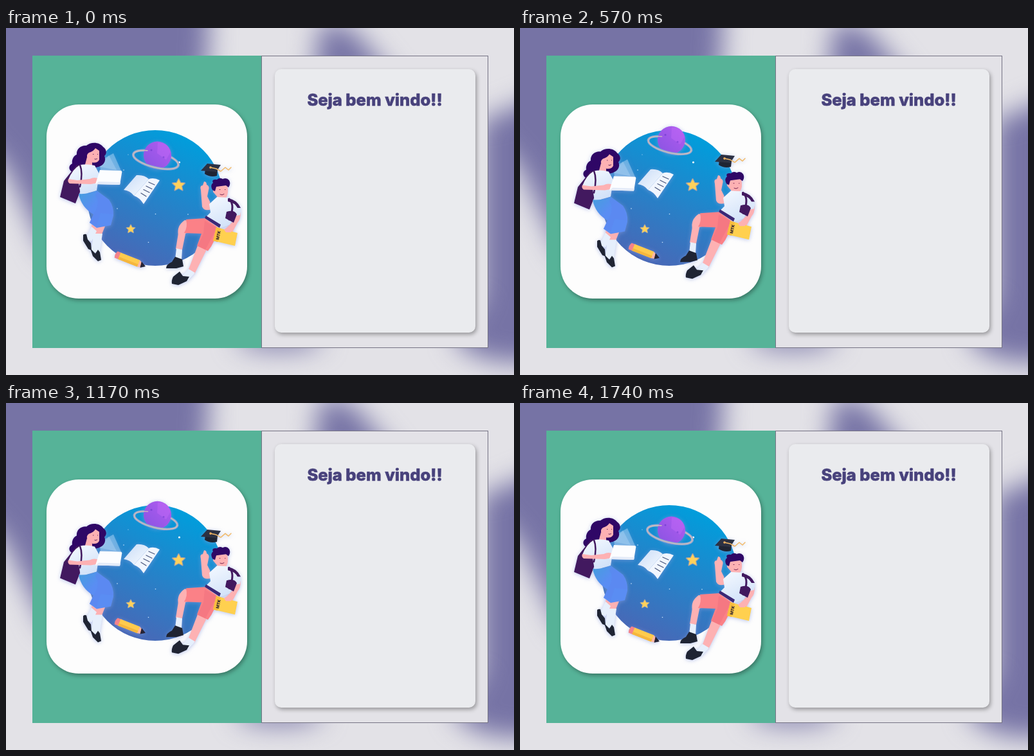
Animation of 790 by 540 pixels, one loop 1770 ms. Source, as an HTML page:

```html
<!DOCTYPE html>
<html lang="pt">
<head>
<meta charset="utf-8">
<title>Seja bem vindo</title>
<style>
html, body { margin: 0; width: 100%; height: 100%; overflow: hidden; background: #e3e2e7 }
svg { display: block; width: 790px; height: 540px }
.blur { filter: blur(20px); fill: #7673a5 }
.card { filter: drop-shadow(2px 3px 3px #0005) }
.glow { filter: drop-shadow(0 1px 3px #8c9fe099) }
.skin { fill: #fdb1b3 }
.hair { fill: #2f0766 }
.bag { fill: #42195f }
.shoe { fill: #1f2433 }
.sock { fill: #e6effc }
.line { fill: none; stroke-linecap: round; stroke-linejoin: round }
.title { font: 800 25.5px Inter, "Open Sans", sans-serif; fill: #48427c; stroke: #48427c; stroke-width: .6; stroke-linejoin: round }
</style>
</head>
<body>
<svg viewBox="0 0 790 540">
<defs>
  <linearGradient id="sky" x1=".75" y1=".05" x2=".3" y2="1"><stop stop-color="#009edc"/><stop offset="1" stop-color="#4b66b5"/></linearGradient>
  <linearGradient id="shirt" x1=".2" y1="0" x2=".7" y2="1"><stop stop-color="#f3f8ff"/><stop offset="1" stop-color="#cfe0f8"/></linearGradient>
  <linearGradient id="jeans" x1="0" y1="0" x2=".7" y2=".7"><stop stop-color="#449fdc"/><stop offset=".6" stop-color="#5a8df3"/></linearGradient>
  <linearGradient id="page" x1="0" y1="0" x2="1" y2="1"><stop stop-color="#c9dcf7"/><stop offset="1" stop-color="#f8fbff"/></linearGradient>
  <linearGradient id="violet" x1="1" y1="0" x2="0" y2="1"><stop stop-color="#b45cf0"/><stop offset="1" stop-color="#8854e2"/></linearGradient>
  <path id="star" d="M0-9L3-3 9.500-2.500 4.600 2 6 8.500 0 5.200-6 8.500-4.600 2-9.500-2.500-3-3Z" fill="#ffd15b" stroke="#8f9bb0" stroke-width="2.500" stroke-linejoin="round" paint-order="stroke"/>
</defs>

<rect width="790" height="540" fill="#e3e2e7"/>
<g class="blur">
  <path d="M-80-80H318L313 60 200 400 62 350 0 218-80 130Z"/>
  <path d="M484 0Q510-18 545 8L612 90H474Q488 40 484 0Z"/>
  <path d="M860 95L738 145V420L694 480Q725 522 800 520H860Z"/>
  <ellipse cx="425" cy="484" rx="68" ry="16"/>
</g>

<rect x="41" y="43" width="356" height="455" fill="#56b398"/>
<rect x="397.5" y="43.500" width="352" height="454" fill="#e3e2e7" stroke="#757384"/>
<rect class="card" x="418" y="64" width="312" height="410" rx="10" fill="#eaebee"/>
<rect class="card" x="63" y="119" width="312" height="302" rx="50" fill="#fdfdfd"/>
<text class="title" x="573.5" y="120.500" text-anchor="middle">Seja bem vindo!!</text>

<circle cx="232" cy="264.5" r="105.5" fill="url(#sky)"/>
<g fill="#cfe6ff">
  <circle cx="269.5" cy="209" r="1.6" fill="#fff"/>
  <circle cx="232.500" cy="289.500" r=".8"/><circle cx="173" cy="281" r=".8"/><circle cx="221.500" cy="333.500" r=".8"/>
  <circle cx="183" cy="221" r=".8"/><circle cx="283" cy="290" r=".8"/><circle cx="190" cy="197" r=".6"/>
</g>

<g class="glow" data-y="-12">
  <path d="M203 229Q215 228 222 235L199 261Q193 253 183 252Z" fill="url(#page)"/>
  <path d="M222 235Q230 232 239 237L214 274Q208 264 199 261Z" fill="#f1f6ff"/>
  <path class="line" d="M222 240l9 4M218 246l9 4.500M214 251.500l9 4.500M210 257l8 5" stroke="#4b577d" stroke-width="1.300"/>
</g>
<use href="#star" x="268.500" y="244"/>
<use href="#star" transform="translate(194 312.500)scale(.7)"/>

<path class="line" data-ring d="M-36 0A36 12 0 0 1 36 0" stroke="#8ba5d3" stroke-width="4"/>
<g class="glow" data-y="-31.500">
  <circle cx="235.500" cy="198" r="21.500" fill="url(#violet)"/>
  <path d="M236 178Q252 178 256 193L249 205 235 195Z" fill="#bd68f5" opacity=".5"/>
  <circle cx="226" cy="190" r="1.500" fill="#7d45d6"/><circle cx="245" cy="201" r="1.500" fill="#8b4bdd"/>
</g>
<g class="line" data-ring>
  <path d="M36 0A36 12 0 0 1-36 0" stroke="#8ba5d3" stroke-width="4"/>
  <path d="M-16-10.700A36 12 0 0 0-36 0A36 12 0 0 0 36 0Q35-6 23-9.200" stroke="#d5c2b8" stroke-width="1.300"/>
</g>

<g class="glow" data-y="-17.500">
  <g transform="translate(170 351.500)rotate(21.500)">
    <path d="M2-5H9V6H1Q-1 0 2-5Z" fill="#f4838b"/>
    <path d="M7-5H39L46 0 39 6H7Z" fill="#ffcb4d"/>
    <path d="M7 2H39V6H7Z" fill="#f5b63d"/>
    <path d="M39-5L46-1 44 5 39 6Z" fill="#fdb7a7"/>
    <path d="M43-3L50 1 44 5Z" fill="#252336" stroke="#252336" stroke-linejoin="round"/>
  </g>
</g>

<g class="glow" data-y="12.500">
  <path d="M145 207L167 195 179 222 147 221Z" fill="#cbe8ff" opacity=".4"/>
  <path d="M146 216L160 198 172 221Z" fill="#d9efff" opacity=".25"/>
  <path class="hair" d="M106 225C97 223 96 214 103 211 102 205 105 199 110 197 109 188 117 182 125 183 132 177 145 177 151 185 157 189 157 196 153 199 156 206 153 213 144 216 138 214L129 211C121 212 118 226 106 225Z"/>
  <path class="bag" d="M110 213L119 214 117 250 108 273 84 263 90 238Z"/>
  <path class="skin" d="M126 201L134 209 134 217 122 216Z"/>
  <path class="skin" d="M129 194Q136 192 139 187L145 191 145 205Q142 211 133 209L127 204Q124 197 129 194Z"/>
  <path class="line" d="M135.500 196.500h.5M142.500 196.500h.2M138 204q2 1 3.500-.5" stroke="#5a245e"/>
  <path d="M115 213Q126 211 138 214L145 227 141 253 116 260 113 241 97 236Q103 220 115 213Z" fill="url(#shirt)"/>
  <path class="line" d="M115 213Q120 225 115 247" stroke="#42195f" stroke-width="2.500"/>
  <path class="skin" d="M97 235L111 237 130 235Q138 231 145 235L143 241 132 243 99 242Q95 239 97 235Z"/>
  <path d="M146 221L179 222Q181 223 180 226L177 244 139 243Z" fill="#fcfdff"/>
  <path d="M140 243L177 244 178 240 144 239Z" fill="#e4ebf8"/>
  <path class="skin" d="M134 304L155 306 147 326 130 323Z"/>
  <path class="sock" d="M133 309L141 316 133 332 124 328ZM136 320L150 320 146 347 137 350 133 344Z"/>
  <path d="M113 258Q128 259 141 253L160 267Q168 278 167 292L163 307 141 311 130 303 136 290Q117 279 113 258Z" fill="url(#jeans)"/>
  <path d="M139 261Q148 272 136 290L130 303 141 307 147 288 167 290 161 268 141 254Z" fill="#5d85ef" opacity=".5"/>
  <path class="shoe" d="M120 322Q122 320 125 321L127 329 132 335 133 346 128 344 120 331ZM131 343L139 351 143 345 146 349 148 361 143 363 135 355Z"/>
</g>

<g class="glow" data-y="-18.500">
  <path class="shoe" d="M310 219L329 221 328 230Q318 233 309 227Z"/>
  <path d="M303 222L313 211 334 213 327 224Z" fill="#2c3143"/>
  <path class="line" d="M318 217L327 219 334 223 341 217 346 221 350 217" stroke="#f2b967" stroke-width="1.500"/>
  <circle cx="318" cy="217" r="1.800" fill="#f6b05f"/>
</g>

<g class="glow" data-y="-13">
  <path class="skin" d="M303 252Q301 245 306 245L308 239Q312 239 312 244 317 246 315 252L313 262 317 270 320 282Q308 286 305 278Z"/>
  <path class="skin" d="M324 246L344 245Q347 258 342 264L339 268 329 266 328 262 322 255Z"/>
  <path class="hair" d="M321 252Q317 244 322 241 319 235 328 236 332 232 337 235 343 232 347 237 350 243 346 248L342 245 327 247 325 254Z"/>
  <path class="line" d="M332 251.500h1M340.500 251.500h.5M333 259q3 2 6-.5" stroke="#7b2854"/>
  <path class="skin" d="M354 284L365 287Q365 298 360 303L352 318 341 319 339 315 352 302Z"/>
  <path class="skin" d="M270 307L281 311 274 345 264 344ZM299 336L312 345 293 383 283 378Z"/>
  <path class="sock" d="M265 343L274 345 273 361 263 360ZM284 375L294 381 283 393 273 388Z"/>
  <path class="shoe" d="M249 374Q249 368 258 364L263 356 274 360 276 371 265 374ZM258 398Q257 393 260 387L270 379 275 386 285 387 281 394 268 400Z"/>
  <path class="skin" d="M278 299L296 303 282 319 268 322Q265 308 278 299Z"/>
  <path d="M280 298L310 296 331 309Q325 334 314 347L297 339 304 320 277 319Q283 310 280 298Z" fill="#fb8187"/>
  <path d="M309 300L328 311 310 345 298 339 307 320Z" fill="#f0717e" opacity=".5"/>
  <path d="M316 274L328 263 346 264 363 276Q366 284 364 291L354 293 348 306 332 312 309 296 318 287Z" fill="url(#shirt)"/>
  <path d="M309 296L311 292 334 306 332 311Z" fill="#3b2876"/>
  <path class="bag" d="M345 265Q359 267 365 280L360 280Q356 272 345 270ZM343 286Q355 282 359 290L354 303 341 296Z"/>
  <path class="line" d="M347 266Q357 276 347 298" stroke="#42195f" stroke-width="3"/>
  <path d="M327 310L360 319 356 339 322 331Z" fill="#ffd04f"/>
  <path d="M327 310L334 312 329 333 322 331Z" fill="#f9bd3e"/>
  <path class="skin" d="M339 314Q345 308 352 310L350 318 342 318Z"/>
  <text transform="translate(331 330)rotate(-78)" font-family="Roboto, sans-serif" font-size="6.500" font-weight="900" fill="#2b2331">MTK</text>
</g>
</svg>
<script>
const LOOP = 1770, STEP = 30, HALF = 870;
const floats = document.querySelectorAll('[data-y]');
const rings = document.querySelectorAll('[data-ring]');

// cubic-bezier(.42, 0, .58, 1), solved by bisection
function easeInOut(x) {
  let lo = 0, hi = 1;
  for (let i = 0; i < 20; i++) {
    const s = (lo + hi) / 2;
    if (s * (1.26 + s * (0.52 * s - 0.78)) < x) lo = s; else hi = s;
  }
  return lo * lo * (3 - 2 * lo);
}

function draw(now) {
  const t = Math.floor(now % LOOP / STEP) * STEP;
  const k = easeInOut(1 - Math.abs(1 - t / HALF));
  for (const el of floats) el.setAttribute('transform', `translate(0 ${el.dataset.y * k})`);
  for (const el of rings)
    el.setAttribute('transform', `translate(233 ${205 - 30 * k}) rotate(14) scale(${1 - 0.06 * k})`);
}

const start = performance.now();
function tick() {
  draw(performance.now() - start);
  requestAnimationFrame(tick);
}
tick();
</script>
</body>
</html>
```
